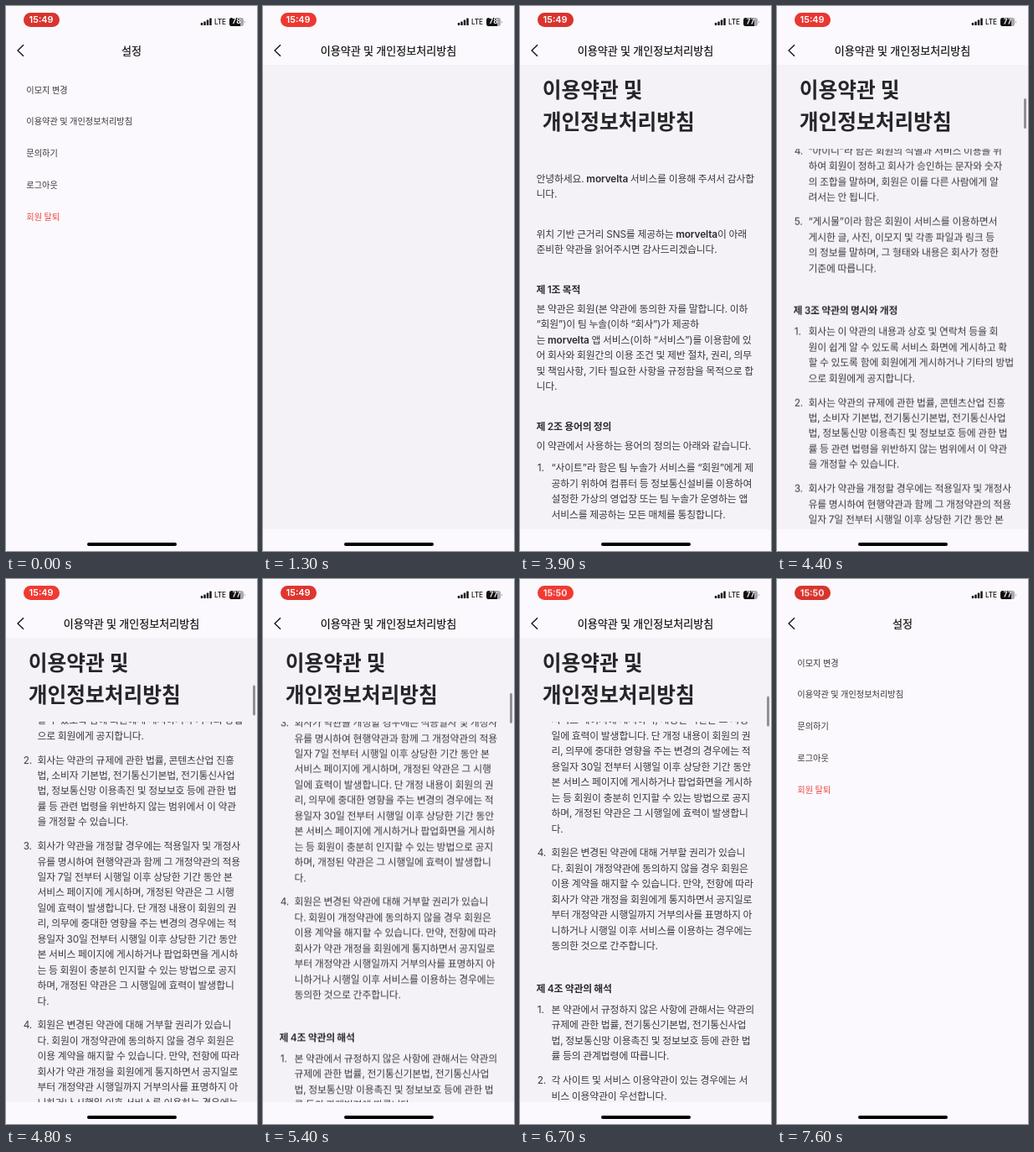
Recreate the animation shown at these times as an HTML page. Size 300 px wide and 649 px high, loop 7.7 s.

```html
<!DOCTYPE html>
<html lang="ko">
<head>
<meta charset="utf-8">
<title>설정</title>
<style>
html, body { margin: 0; width: 100%; height: 100%; overflow: hidden; background: #fbf9fd; }
.stage {
  --loop: 7700ms;
  position: relative; width: 300px; height: 649px; overflow: hidden;
  font-family: Inter, "Noto Sans CJK KR", "Noto Sans CJK JP", "Noto Sans CJK", sans-serif;
  color: #38373b; white-space: pre;
}
.stage > *, .page > *, .web > * { position: absolute; }
.page { inset: 0; background: #fbf9fd; }
.bar {
  top: 43px; width: 100%; text-align: center; color: #111;
  font-size: 13.05px; line-height: 20px; word-spacing: -.5px; -webkit-text-stroke: .2px;
}
.back { left: 0; top: 40px; fill: none; stroke: #111; stroke-width: 1.35; }

/* settings */
.menu { left: 24.3px; top: 81.6px; font-size: 10.2px; line-height: 37.75px; word-spacing: -.4px; }
.menu .leave { color: #ec4a44; }
.shade { inset: 0; background: #000; opacity: 0; animation: shade var(--loop) var(--slide) infinite; }
.settings { animation: under var(--loop) var(--slide) infinite; }
.terms { transform: translateX(100%); animation: push var(--loop) var(--slide) infinite; }

/* terms */
.web { left: 0; top: 70px; width: 300px; height: 553px; background: #f4f2f6; overflow: hidden; }
.web > * { opacity: 0; animation: load var(--loop) step-end infinite; }
h1 {
  left: 26.7px; top: 12.3px; margin: 0; color: #262529;
  font-size: 24.75px; line-height: 37.6px; font-weight: 700;
}
.view { left: 0; top: 99.5px; width: 300px; height: 453.5px; overflow: hidden; }
.doc {
  position: absolute; left: 19.5px; top: 27.3px;
  font-size: 11.85px; line-height: 18.46px; letter-spacing: -.14px; word-spacing: -.4px;
  animation: scroll var(--loop) var(--glide) infinite;
}
.doc p, .doc h2, .doc ol { margin: 0; padding: 0; font-size: inherit; }
.doc b, .doc h2 { font-weight: 600; color: #2b2a2e; }
.doc p + p, .doc p + h2 { margin-top: 29px; }
.doc h2 + p { margin-top: 4.8px; }
.doc p + ol { margin-top: 8.2px; }
.doc ol + h2 { margin-top: 31.9px; }
.doc h2 + ol { margin-top: 7px; }
.doc ol { list-style: none; counter-reset: n; }
.doc li { position: relative; padding-left: 18px; counter-increment: n; }
.doc li + li { margin-top: 10.35px; }
.doc li::before { content: counter(n) "."; position: absolute; left: 1.2px; }
.web > .track { left: 294.7px; top: 1.6px; animation-name: reveal; }
.thumb {
  width: 3px; height: 36px; border-radius: 2px; background: #929096;
  animation: thumb var(--loop) var(--glide) infinite;
}

/* system chrome */
.clock {
  left: 20.6px; top: 8.2px; width: 43px; height: 16.6px; border-radius: 8.3px;
  overflow: hidden; color: #fff; text-align: center;
  font-size: 10.9px; line-height: 16.6px; font-weight: 600;
  animation: pulse var(--loop) ease-in-out infinite;
}
.roll { animation: clock var(--loop) step-end infinite; }
.signal { left: 0; top: 0; }
.lte { left: 249px; top: 14px; font-size: 8.3px; line-height: 11px; font-weight: 500; color: #111; letter-spacing: -.2px; }
.battery {
  left: 267px; top: 14.3px; width: 17px; height: 9.5px; border-radius: 2.8px; overflow: hidden;
  background: linear-gradient(90deg, #111 78%, #aaa8ad 78%);
  color: #fff; text-align: center; font-size: 8.5px; line-height: 9.5px; font-weight: 700;
}
.battery .roll { animation-name: charge; }
.home { left: 97px; top: 639px; width: 106.5px; height: 3.8px; border-radius: 2px; background: #000; }

@keyframes push {
  0%, 6.88%, 93.64%, 100% { transform: translateX(100%); }
  13.38%, 87.27% { transform: translateX(0); }
}
@keyframes under {
  0%, 6.88%, 93.64%, 100% { transform: translateX(0); }
  13.38%, 87.27% { transform: translateX(-30%); }
}
@keyframes shade {
  0%, 6.88%, 93.64%, 100% { opacity: 0; }
  13.38%, 87.27% { opacity: .1; }
}
@keyframes load { 0% { opacity: 0; } 25.97%, 100% { opacity: 1; } }
@keyframes reveal { 0% { opacity: 0; } 51.82%, 100% { opacity: 1; } }
@keyframes scroll {
  0%, 51.818% { transform: translateY(0); }
  88.312%, 100% { transform: translateY(-1055.9px); }
}
@keyframes thumb {
  0%, 51.818% { transform: translateY(0); }
  88.312%, 100% { transform: translateY(67.6px); }
}
@keyframes pulse {
  0%, .65%, 25.32%, 50%, 74.68%, 99.35%, 100% { background: #d9342e; }
  12.99%, 37.66%, 62.34%, 87.01% { background: #f03a33; }
}
@keyframes clock { 0% { transform: none; } 81.82%, 100% { transform: translateY(-50%); } }
@keyframes charge { 0% { transform: none; } 36.36%, 100% { transform: translateY(-50%); } }
</style>
<script>
// Flick deceleration: speed decays by e^-2 per second over the glide.
const seconds = 2.81, steps = 40;
const travelled = t => (1 - Math.exp(-2 * t)) / (1 - Math.exp(-2 * seconds));
const stops = Array.from({ length: steps + 1 }, (_, i) => travelled(seconds * i / steps).toFixed(5));
const root = document.documentElement.style;
root.setProperty('--glide', `linear(${stops.join(', ')})`);
root.setProperty('--slide', 'cubic-bezier(.2, .5, .2, 1)');
</script>
</head>
<body>
<div class="stage"><div class="page settings"><div class="bar">설정</div><svg class="back" width="30" height="26"><path d="M21 6.2 14 13 21 19.8"/></svg><div class="menu">이모지 변경
이용약관 및 개인정보처리방침
문의하기
로그아웃
<span class="leave">회원 탈퇴</span></div></div><div class="shade"></div><div class="page terms"><div class="bar">이용약관 및 개인정보처리방침</div><svg class="back" width="30" height="26"><path d="M21 6.2 14 13 21 19.8"/></svg><div class="web"><h1>이용약관 및
개인정보처리방침</h1><div class="view"><div class="doc"><p>안녕하세요. <b>morvelta</b> 서비스를 이용해 주셔서 감사합
니다.</p><p>위치 기반 근거리 SNS를 제공하는 <b>morvelta</b>이 아래
준비한 약관을 읽어주시면 감사드리겠습니다.</p><h2>제 1조 목적</h2><p>본 약관은 회원(본 약관에 동의한 자를 말합니다. 이하
“회원”)이 팀 누솔(이하 “회사”)가 제공하
는 <b>morvelta</b> 앱 서비스(이하 “서비스”)를 이용함에 있
어 회사와 회원간의 이용 조건 및 제반 절차, 권리, 의무
및 책임사항, 기타 필요한 사항을 규정함을 목적으로 합
니다.</p><h2>제 2조 용어의 정의</h2><p>이 약관에서 사용하는 용어의 정의는 아래와 같습니다.</p><ol><li>“사이트”라 함은 팀 누솔가 서비스를 “회원”에게 제
공하기 위하여 컴퓨터 등 정보통신설비를 이용하여
설정한 가상의 영업장 또는 팀 누솔가 운영하는 앱
서비스를 제공하는 모든 매체를 통칭합니다.</li><li>“서비스”라 함은 회사가 회원에게 제공하는 위치
기반의 대화 및 정보 공유 등 관련된 모든 기능을
말합니다.</li><li>“회원”이라 함은 본 약관에 동의하고 개인정보를
제공하여 가입한 자로서, 회사가 제공하는 서비스
를 이용할 수 있는 자를 말합니다.</li><li>“아이디”라 함은 회원의 식별과 서비스 이용을 위
하여 회원이 정하고 회사가 승인하는 문자와 숫자
의 조합을 말하며, 회원은 이를 다른 사람에게 알
려서는 안 됩니다.</li><li>“게시물”이라 함은 회원이 서비스를 이용하면서
게시한 글, 사진, 이모지 및 각종 파일과 링크 등
의 정보를 말하며, 그 형태와 내용은 회사가 정한
기준에 따릅니다.</li></ol><h2>제 3조 약관의 명시와 개정</h2><ol><li>회사는 이 약관의 내용과 상호 및 연락처 등을 회
원이 쉽게 알 수 있도록 서비스 화면에 게시하고 확
할 수 있도록 함에 회원에게 게시하거나 기타의 방법
으로 회원에게 공지합니다.</li><li>회사는 약관의 규제에 관한 법률, 콘텐츠산업 진흥
법, 소비자 기본법, 전기통신기본법, 전기통신사업
법, 정보통신망 이용촉진 및 정보보호 등에 관한 법
률 등 관련 법령을 위반하지 않는 범위에서 이 약관
을 개정할 수 있습니다.</li><li>회사가 약관을 개정할 경우에는 적용일자 및 개정사
유를 명시하여 현행약관과 함께 그 개정약관의 적용
일자 7일 전부터 시행일 이후 상당한 기간 동안 본
서비스 페이지에 게시하며, 개정된 약관은 그 시행
일에 효력이 발생합니다. 단 개정 내용이 회원의 권
리, 의무에 중대한 영향을 주는 변경의 경우에는 적
용일자 30일 전부터 시행일 이후 상당한 기간 동안
본 서비스 페이지에 게시하거나 팝업화면을 게시하
는 등 회원이 충분히 인지할 수 있는 방법으로 공지
하며, 개정된 약관은 그 시행일에 효력이 발생합니
다.</li><li>회원은 변경된 약관에 대해 거부할 권리가 있습니
다. 회원이 개정약관에 동의하지 않을 경우 회원은
이용 계약을 해지할 수 있습니다. 만약, 전항에 따라
회사가 약관 개정을 회원에게 통지하면서 공지일로
부터 개정약관 시행일까지 거부의사를 표명하지 아
니하거나 시행일 이후 서비스를 이용하는 경우에는
동의한 것으로 간주합니다.</li></ol><h2>제 4조 약관의 해석</h2><ol><li>본 약관에서 규정하지 않은 사항에 관해서는 약관의
규제에 관한 법률, 전기통신기본법, 전기통신사업
법, 정보통신망 이용촉진 및 정보보호 등에 관한 법
률 등의 관계법령에 따릅니다.</li><li>각 사이트 및 서비스 이용약관이 있는 경우에는 서
비스 이용약관이 우선합니다.</li></ol></div></div><div class="track"><div class="thumb"></div></div></div></div><div class="clock"><div class="roll">15:49
15:50</div></div><svg class="signal" width="300" height="30" fill="#111"><rect x="232.8" y="20" width="2.4" height="3" rx=".6"/><rect x="236.3" y="18.4" width="2.4" height="4.6" rx=".6"/><rect x="239.8" y="16.6" width="2.4" height="6.4" rx=".6"/><rect x="243.3" y="14.6" width="2.4" height="8.4" rx=".6"/><path d="M284.8 17.4q1.2.5 1.2 1.7t-1.2 1.7z" fill="#aaa8ad"/></svg><div class="lte">LTE</div><div class="battery"><div class="roll">78
77</div></div><div class="home"></div></div>
</body>
</html>
```
